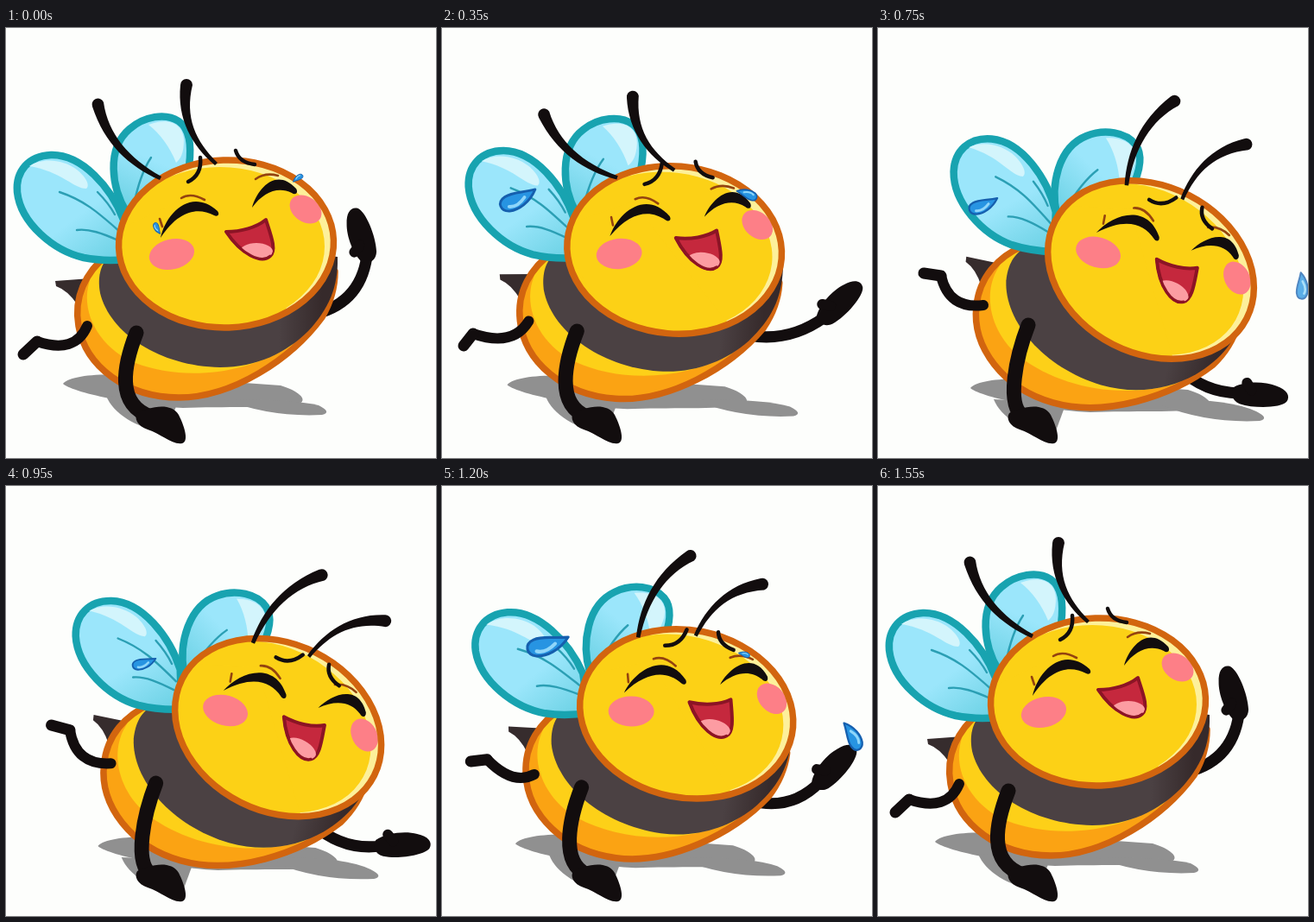
Animation of 498 by 498 pixels, one loop 1.6 s. Source, as an HTML page:

```html
<!DOCTYPE html>
<html lang="en">
<head>
<meta charset="utf-8">
<title>Laughing bee</title>
<style>
html, body { margin: 0; width: 100%; height: 100%; overflow: hidden; background: #fdfefc; }
svg { display: block; width: 100vw; height: 100vh; }
.line { fill: none; stroke-linecap: round; stroke-linejoin: round; }
.ink { stroke: #120d0e; }
.inkFill { fill: #120d0e; }
.rim { stroke: #d2650f; stroke-width: 7.5; }
.wing { stroke: #18a3b0; stroke-width: 8.5; stroke-linejoin: round; }
.shine { fill: #d3f5fc; }
.vein { stroke: #2b9fb4; stroke-width: 2.4; }
.crease { stroke: #94430f; stroke-width: 2.6; }
.blush { fill: #fd7f87; }
</style>
</head>
<body>
<svg viewBox="0 0 498 498">
  <defs>
    <clipPath id="bodyClip"><path d="M118 262C92 283 78 312 84 345C92 392 140 428 200 428C262 428 330 384 366 335C380 312 386 285 378 255Z"/></clipPath>
    <clipPath id="faceClip"><ellipse cx="255" cy="250" rx="124" ry="97" transform="rotate(-2 255 250)"/></clipPath>
    <clipPath id="mouthClip"><path d="M255 236C272 236 290 231 301 222C306 238 314 257 306 264C296 273 273 263 255 236Z"/></clipPath>
    <linearGradient id="stripe" x1="110" x2="385" y1="0" y2="0" gradientUnits="userSpaceOnUse">
      <stop offset=".75" stop-color="#4b4143"/><stop offset=".93" stop-color="#362a2b"/>
    </linearGradient>
    <linearGradient id="frontFill" x1="55" y1="160" x2="130" y2="262" gradientUnits="userSpaceOnUse">
      <stop offset=".5" stop-color="#9be6fb"/><stop offset="1" stop-color="#6fd3e6"/>
    </linearGradient>
    <linearGradient id="backFill" x1="185" y1="105" x2="140" y2="205" gradientUnits="userSpaceOnUse">
      <stop offset=".45" stop-color="#9be6fb"/><stop offset="1" stop-color="#6fd3e6"/>
    </linearGradient>
  </defs>

  <g fill="#909090">
    <path id="bodyShadow" d="M66 412C75 402 110 400 150 402L318 414C338 420 350 430 340 435C310 441 250 438 205 440C160 438 80 424 66 412Z"/>
    <path id="footShadow" d="M116 426C124 446 150 464 186 468L200 430Z"/>
    <path id="armShadow"/>
  </g>

  <path id="arm" class="line ink" stroke-width="13"/>
  <g id="hand">
    <path class="inkFill" d="M-6-7C6-15 28-17 42-13C55-10 60-3 56 4C50 12 20 16 2 12C-8 9-10 0-6-7Z"/>
    <path class="line ink" stroke-width="12" d="M14-5L8-13"/>
  </g>

  <g id="body">
    <path fill="#362c2d" d="M57 293L98 290L83 321Q72 304 58 299Z"/>
    <g clip-path="url(#bodyClip)">
      <path fill="#fba313" d="M60 240H400V440H60Z"/>
      <path fill="#fdd018" d="M95 300C88 335 112 373 150 388C200 407 270 405 330 368L390 300V240H110Z"/>
    </g>
    <path class="line rim" d="M118 262C92 283 78 312 84 345C92 392 140 428 200 428C262 428 330 384 366 335C376 318 381 300 381 282"/>
    <path fill="url(#stripe)" d="M122 262C108 274 106 290 109 307C120 353 178 392 248 393C290 393 325 376 350 351C374 325 385 300 384 265L300 255Z"/>
  </g>

  <path id="leg" class="line ink" stroke-width="12"/>
  <path id="toe" class="line ink" stroke-width="13"/>

  <g id="backWing">
    <path class="wing" fill="url(#backFill)" d="M140 214C122 185 116 140 143 117C160 102 185 98 200 108C213 117 215 137 212 160L190 214Z"/>
    <path class="shine" d="M165 112C185 104 205 108 206 130C206 145 202 152 197 156C190 138 178 122 165 112Z"/>
    <path class="line vein" d="M148 205C152 185 158 165 168 150M158 205C166 190 176 180 184 172"/>
  </g>
  <g id="frontWing">
    <path class="wing" fill="url(#frontFill)" d="M136 222C122 185 88 146 52 147C26 148 11 166 13 190C17 226 55 258 90 266C105 269 118 270 140 268Z"/>
    <path class="shine" d="M27 160C42 150 66 152 82 164C92 172 98 182 93 186C78 186 64 166 27 160Z"/>
    <path class="line vein" d="M132 236C108 215 92 200 62 190M130 246C112 238 96 232 82 234M126 216C120 205 112 196 106 190"/>
  </g>

  <g id="head">
    <ellipse cx="255" cy="250" rx="124.5" ry="97" transform="rotate(-2 255 250)" fill="#fdf09a"/>
    <g clip-path="url(#faceClip)">
      <ellipse cx="248" cy="253" rx="121" ry="92" fill="#fcd116"/>
      <path fill="#fcd116" d="M128 235C140 300 190 350 275 350L330 330L200 200Z"/>
      <ellipse class="blush" cx="347" cy="210" rx="20" ry="14.5" transform="rotate(34 347 210)"/>
    </g>
    <ellipse class="line rim" cx="255" cy="250" rx="124.5" ry="97" transform="rotate(-2 255 250)"/>

    <ellipse class="blush" cx="192" cy="262" rx="26.5" ry="17.5" transform="rotate(-13 192 262)"/>
    <g class="inkFill">
      <path d="M179 243C185 215 214 184 245 212C248 216 245 219 241 217C222 207 200 211 179 243Z"/>
      <path d="M285 208C290 188 312 160 336 186C339 191 335 194 331 191C315 183 298 190 285 208Z"/>
    </g>
    <path class="line crease" d="M203 197Q214 190 230 199M289 175Q300 167 315 171M178 221L181 230"/>
    <path fill="#c5283d" stroke="#8c1425" stroke-width="4" stroke-linejoin="round" d="M255 236C272 236 290 231 301 222C306 238 314 257 306 264C296 273 273 263 255 236Z"/>
    <ellipse cx="290" cy="259" rx="19" ry="10" fill="#fc9ca2" clip-path="url(#mouthClip)"/>
    <path class="line" stroke="#8c1425" stroke-width="3" d="M255 236C273 263 296 273 306 264"/>

    <path id="browL" class="line ink" stroke-width="4.5" d="M225 150Q227 170 211 178"/>
    <path id="browR" class="line ink" stroke-width="4.5" d="M266 142Q270 156 288 158"/>
  </g>
  <g id="feelers">
    <path id="feelerL" class="inkFill" d="M178 176C142 160 114 134 100 91A6.7 6.7 0 0 1 113 86C118 122 142 151 180 172Z"/>
    <path id="feelerR" class="inkFill" d="M242 159C215 136 198 105 202 66A6.9 6.9 0 0 1 216 66C207 103 219 131 245 156Z"/>
  </g>

  <path id="foreleg" class="line ink" stroke-width="17"/>
  <path class="inkFill" d="M152 446C164 440 190 432 200 448C207 462 212 479 204 481C192 483 180 470 164 465C152 461 148 452 152 446Z"/>
  <g id="tears"></g>
</svg>

<script>
const $ = id => document.getElementById(id);
const LOOP = 1600, STEP = 50;
const times = [0, 350, 550, 750, 1100, 1350, 1550];
const N = times.length - 1;

const pose = {
  feeler:  [-39.5, -48.4, -4, 30.5, 43.5, 8.4],
  wingF:   [0, 2, 2.5, 7, -1, -4],
  wingB:   [0, 3, 20, 19, 21, 6],
  shX:     [350, 350, 348, 350, 358, 352],
  shY:     [333, 355, 388, 395, 380, 340],
  elbowX:  [410, 400, 375, 378, 400, 408],
  elbowY:  [322, 366, 420, 422, 408, 330],
  wristX:  [418, 443, 420, 418, 443, 425],
  wristY:  [264, 335, 417, 423, 389, 274],
  hand:    [-105, -42, 0, 6, -20, -83],
  kneeX:   [80, 82, 92, 82, 82, 82],
  kneeY:   [378, 370, 343, 326, 333, 370],
  heelX:   [36, 36, 55, 73, 65, 34],
  heelY:   [363, 354, 316, 287, 296, 350],
  toeX:    [20, 25, 37, 53, 44, 18],
  toeY:    [378, 368, 323, 284, 293, 361],
  shadow:  [372, 413, 449, 448, 414, 377]
};

// Each drop: three (time, x, y) points and a size.
const drops = [
  [0, 175, 232, 350, 88, 198, 500, 40, 240, .95],
  [500, 258, 228, 750, 122, 205, 880, 80, 250, .75],
  [800, 235, 225, 950, 160, 205, 1130, 118, 292, .6],
  [1020, 250, 196, 1100, 188, 178, 1300, 70, 220, 1.05],
  [0, 338, 174, 150, 410, 160, 300, 480, 230, .9],
  [330, 345, 190, 550, 438, 230, 660, 486, 260, 1],
  [420, 400, 175, 550, 453, 193, 800, 492, 340, .65],
  [980, 390, 244, 1100, 446, 262, 1400, 486, 380, .75],
  [1200, 350, 195, 1350, 463, 253, 1500, 500, 360, .9]
];

const gap = i => times[(i + N) % N + 1] - times[(i + N) % N];

// Smooth periodic curve through the key values.
function curve(v, t) {
  let i = 0;
  while (i < N - 1 && t >= times[i + 1]) i++;
  const at = k => v[(k + N) % N];
  const rate = k => (at(k + 1) - at(k)) / gap(k);
  const slope = k => (gap(k) * rate(k - 1) + gap(k - 1) * rate(k)) / (gap(k) + gap(k - 1));
  const h = gap(i), u = (t - times[i]) / h, w = 1 - u;
  return at(i) * w * w * (1 + 2 * u) + at(i + 1) * u * u * (3 - 2 * u)
    + h * u * w * (w * slope(i) - u * slope(i + 1));
}

function ease(t, from, to) {
  const u = Math.min(1, Math.max(0, (t - from) / (to - from)));
  return u * u * u * (10 + u * (6 * u - 15));
}

function through(t, t0, a, t1, b, t2, c) {
  const s = (b - a) / (t1 - t0);
  const q = ((c - b) / (t2 - t1) - s) / (t2 - t0);
  return a + s * (t - t0) + q * (t - t0) * (t - t1);
}

function drop(t, [t0, x0, y0, t1, x1, y1, t2, x2, y2, size]) {
  if (t < t0 || t >= t2) return "";
  const x = s => through(s, t0, x0, t1, x1, t2, x2);
  const y = s => through(s, t0, y0, t1, y1, t2, y2);
  const turn = Math.atan2(y(t + 1) - y(t - 1), x(t + 1) - x(t - 1)) * 180 / Math.PI;
  const scale = size * Math.min(1, .32 + (t - t0) / 100);
  const alpha = Math.min(1, .3 + (t2 - t) / 110);
  return `<g transform="translate(${x(t)} ${y(t)}) rotate(${turn}) scale(${scale})" opacity="${alpha}">
    <path d="M-24 0C-10-11 6-12 16-8C26-3 25 9 13 10C2 11-8 4-24 0Z" fill="#2794e2" stroke="#155fae" stroke-width="3" stroke-linejoin="round"/>
    <path d="M-8-2C0-6 8-7 14-3" class="line" stroke="#8fd6fa" stroke-width="4"/></g>`;
}

const move = (id, value) => $(id).setAttribute("transform", value);
const trace = (id, d) => $(id).setAttribute("d", d);

function draw(t) {
  const k = {};
  for (const name in pose) k[name] = curve(pose[name], t);
  const p = ease(t, 150, 725) - ease(t, 875, 1500);
  const tilt = `translate(${61 * p} ${30 * p}) rotate(${29 * p} 255 250)`;

  move("body", `rotate(${16 * p} 180 440)`);
  move("head", tilt);
  move("frontWing", `translate(${64 * p} ${-10 * p}) rotate(${k.wingF} 130 270)`);
  move("backWing", `translate(${67 * p} 0) rotate(${k.wingB} 135 215)`);
  move("browL", `translate(${3 * p} ${2 * p}) rotate(${30 * p} 211 178)`);
  move("browR", `translate(${6 * p} ${16 * p})`);

  const sway = k.feeler + 39.5 - 29 * p;
  move("feelers", `translate(${2 * p} ${5 * p}) ${tilt}`);
  move("feelerL", `rotate(${sway} 178 174)`);
  move("feelerR", `rotate(${sway} 243 157)`);

  trace("arm", `M${k.shX} ${k.shY}Q${k.elbowX} ${k.elbowY} ${k.wristX} ${k.wristY}`);
  move("hand", `translate(${k.wristX} ${k.wristY}) rotate(${k.hand})`);

  trace("leg", `M${94 + 28 * p} ${345 - 24 * p}Q${k.kneeX} ${k.kneeY} ${k.heelX} ${k.heelY}`);
  trace("toe", `M${k.heelX} ${k.heelY}L${k.toeX} ${k.toeY}`);

  const x = 151 + 23 * p, y = 353 - 9 * p;
  trace("foreleg", `M${x} ${y}C${x - 14} ${y + 36} ${126 + 22 * p} 436 168 450`);

  const s = k.shadow;
  move("bodyShadow", `translate(${41 * p} ${5 * p})`);
  move("footShadow", `translate(${18 * p} ${4 * p})`);
  trace("armShadow", `M${s - 110} 430Q${s - 40} 430 ${s - 10} ${437 + 7 * p}q16 8 4 11q-60 3-114-18z`);

  $("tears").innerHTML = drops.map(d => drop(t, d)).join("");
}

function tick() {
  const t = Math.floor(performance.now() % LOOP / STEP) * STEP;
  draw(t);
  requestAnimationFrame(tick);
}
tick();
</script>
</body>
</html>
```
